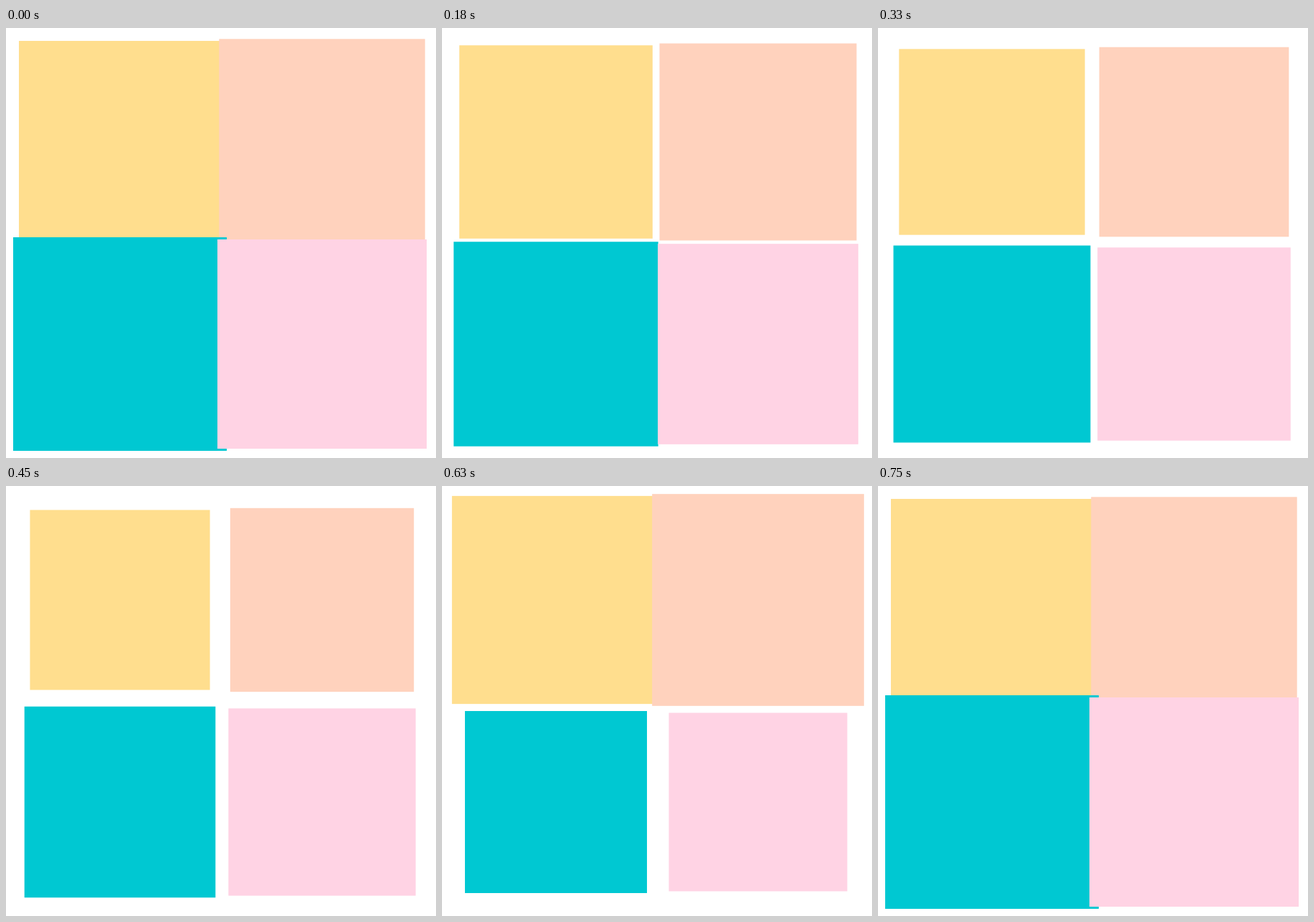
An HTML page with a canvas that plays this animation: 600x600 px, repeating every 780 ms.

```html
<!DOCTYPE html>
<html lang="en">
<head>
<meta charset="utf-8">
<title>Pulsing squares</title>
<style>
  html, body { margin: 0; width: 100%; height: 100%; overflow: hidden; background: #fff; }
  canvas { display: block; width: 600px; height: 600px; }
</style>
</head>
<body>
<canvas id="stage" width="600" height="600"></canvas>
<script>
const ctx = document.getElementById('stage').getContext('2d');
const STEP = 30, STEPS = 26, CYCLE = 25;

// Painted in order; half = half side at step 0, rate = shrink per step, reset = step of the jump back
const squares = [
  { x: 159, y: 159, color: '#ffde8e', half: 141,   rate: 1.03,  reset: 18 },
  { x: 441, y: 159, color: '#ffd2bd', half: 143.7, rate: 1.035, reset: 21 },
  { x: 159, y: 441, color: '#00c8d2', half: 149,   rate: 1.047, reset: 25 },
  { x: 441, y: 441, color: '#ffd3e4', half: 146,   rate: 1.024, reset: 23 }
];

function draw(time) {
  const step = Math.floor(time / STEP) % STEPS;
  ctx.fillStyle = '#fff';
  ctx.fillRect(0, 0, 600, 600);
  for (const s of squares) {
    const age = step < s.reset ? step : step - CYCLE;
    const h = s.half - s.rate * age;
    ctx.fillStyle = s.color;
    ctx.fillRect(s.x - h, s.y - h, 2 * h, 2 * h);
  }
}

const start = performance.now();
function tick() {
  draw(performance.now() - start);
  requestAnimationFrame(tick);
}
tick();
</script>
</body>
</html>
```
